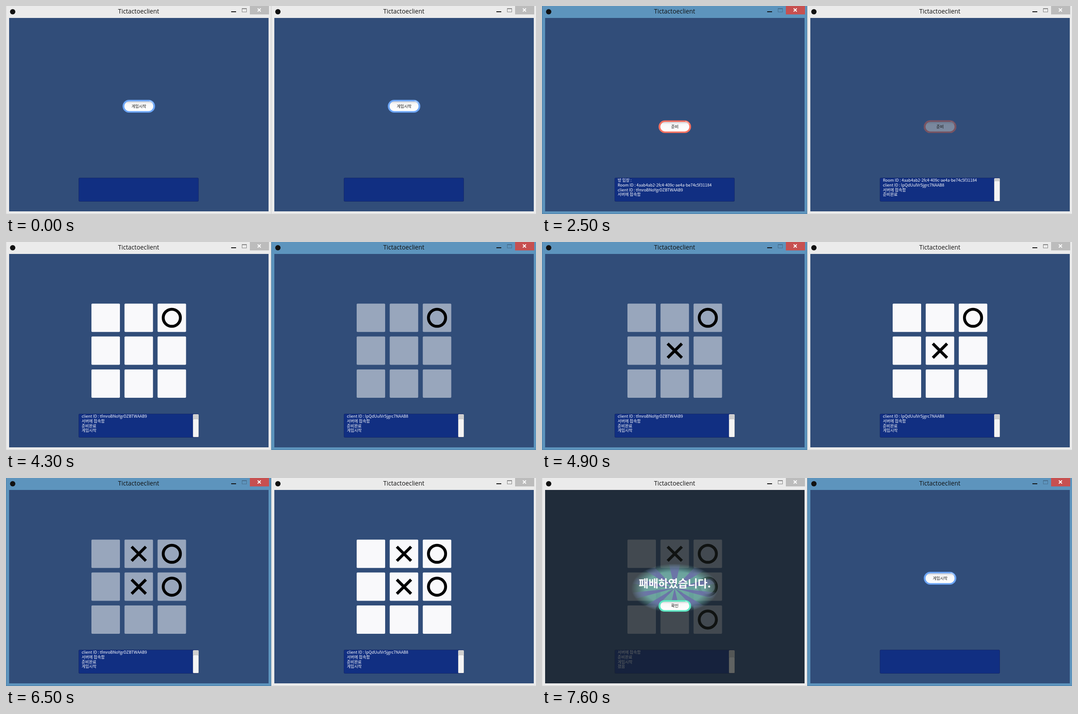
Animation, 1191 px wide and 470 px high, one loop 8000 ms. Source, as an HTML page with a canvas:

```html
<!DOCTYPE html>
<html lang="ko">
<head>
<meta charset="utf-8">
<title>Tictactoeclient</title>
<style>
  html, body { margin: 0; width: 100%; height: 100%; overflow: hidden; background: #ebebeb; }
  canvas { display: block; }
</style>
</head>
<body>
<canvas id="stage" width="1191" height="470"></canvas>
<script>
const ctx = document.getElementById('stage').getContext('2d');
const LOOP = 8000, STEP = 100;
const KOREAN = '"Noto Sans CJK KR", "Noto Sans CJK", sans-serif';

// Focus moves to the other window at each of these times.
const focusSwitches = [1900, 4000, 4700, 5400, 6200, 6800];

// Cell, time seen in the left window, time seen in the right window.
const moves = [[2, 4300, 4000], [4, 4700, 4900], [5, 5700, 5400], [1, 6200, 6500], [8, 7100, 6800]];

const players = [
  { x: 0, id: 'tfmroBNoYgrDZBTWAAB9', press: 2100, join: 2500, ready: [2700, 3000], readyLog: 2900,
    over: [7000, 7300], confirm: Infinity, leave: Infinity, result: '패배하였습니다.', note: '졌음' },
  { x: 596, id: 'lpQdUulVr5jgrc7NAAB8', press: 700, join: 1100, ready: [1300, 1600], readyLog: 1500,
    over: [6700, 6900], confirm: 7200, leave: 7500, result: '승리하였습니다.', note: '이겼음' }
];
const BOARD_TIME = 3100;

const ramp = (t, [from, to]) => Math.min(1, Math.max(0, (t - from) / (to - from)));

function rect(x, y, w, h, color) {
  ctx.fillStyle = color;
  ctx.fillRect(x, y, w, h);
}

function round(x, y, w, h, r, color) {
  ctx.beginPath();
  ctx.roundRect(x, y, w, h, r);
  ctx.fillStyle = color;
  ctx.fill();
}

function path(points, color, width) {
  ctx.beginPath();
  for (const [x1, y1, x2, y2] of points) {
    ctx.moveTo(x1, y1);
    ctx.lineTo(x2, y2);
  }
  ctx.strokeStyle = color;
  ctx.lineWidth = width;
  ctx.stroke();
}

function cross(x, y, d, color, width) {
  path([[x - d, y - d, x + d, y + d], [x - d, y + d, x + d, y - d]], color, width);
}

function label(text, x, y, font, color, align = 'center') {
  ctx.font = font;
  ctx.textAlign = align;
  ctx.textBaseline = 'middle';
  ctx.fillStyle = color;
  ctx.fillText(text, x, y);
}

function drawFrame(active) {
  rect(0, 0, 596, 470, active ? '#5d94bd' : '#ebebeb');
  ctx.strokeStyle = active ? '#4c7fa6' : '#dadada';
  ctx.lineWidth = 1;
  ctx.strokeRect(0.5, -1, 595, 470.5);
  ctx.beginPath();
  ctx.arc(15, 13, 6, 0, 7);
  ctx.fillStyle = '#111';
  ctx.fill();
  label('Tictactoeclient', 298, 13.5, '13.8px "Open Sans", sans-serif', '#111');
  rect(506, 12, 11, 2, '#111');
  const grey = active ? '#486f8e' : '#858585';
  ctx.strokeStyle = grey;
  ctx.strokeRect(530.5, 6.5, 10, 7);
  rect(530, 5, 11, 2, grey);
  rect(548, 0, 43, 19, active ? '#c75050' : '#bcbcbc');
  cross(569, 9, 3.5, '#fff', 2);
  rect(7, 27, 583, 437, '#314d79');
}

function drawButton(text, y, h, color, veil) {
  round(262, y, 73, h, h / 2, color);
  ctx.beginPath();
  ctx.arc(320, y + h / 2, h / 2 - 2, -1.4, -0.5);
  ctx.strokeStyle = 'rgba(255,255,255,.5)';
  ctx.lineWidth = 1.5;
  ctx.stroke();
  const shine = ctx.createLinearGradient(0, y + 3, 0, y + h - 3);
  shine.addColorStop(0, '#cfcfd4');
  shine.addColorStop(0.25, '#f8f8f8');
  shine.addColorStop(1, '#fff');
  round(266, y + 3.5, 65, h - 7, h / 2 - 3.5, shine);
  if (veil) round(262, y, 73, h, h / 2, veil);
  label(text, 298.5, y + h / 2, '9px ' + KOREAN, '#111');
}

function drawBoard(t, side) {
  const seen = moves.filter(m => t >= m[side + 1]);
  const myTurn = seen.length < 5 && seen.length % 2 !== side;
  const alpha = myTurn ? 0.97 : seen.length ? 0.5 : 1 - 0.5 * ramp(t, [BOARD_TIME - 100, 3300]);
  const at = cell => [192 + cell % 3 * 74.3, 139.3 + Math.floor(cell / 3) * 74.3];
  for (let cell = 0; cell < 9; cell++) round(...at(cell), 64, 64, 2, `rgba(255,255,255,${alpha})`);
  seen.forEach(([cell], i) => {
    const [x, y] = at(cell).map(v => v + 32);
    if (i % 2) return cross(x, y, 16, '#000', 6.5);
    ctx.beginPath();
    ctx.arc(x, y, 19.3, 0, 7);
    ctx.strokeStyle = '#000';
    ctx.lineWidth = 6.5;
    ctx.stroke();
  });
}

function drawLog(t, p) {
  round(163, 388, 270, 54, 3, '#15296a');
  round(164, 389, 268, 52, 2, '#112f82');
  if (t < p.join || t >= p.leave) return;
  const lines = ['방 입장 :', 'Room ID : 4aab4ab2-2fc4-409c-ae4a-be74c5f31184', 'client ID : ' + p.id, '서버에 접속함'];
  if (t >= p.readyLog) lines.push('준비완료');
  if (t >= BOARD_TIME) lines.push('게임시작');
  if (t > p.over[0]) lines.push(p.note);
  lines.slice(-4).forEach((line, i) => label(line, 170, 393.5 + i * 10.8, '9px ' + KOREAN, '#fff', 'left'));
  if (lines.length > 4) {
    const top = 395 + (lines.length - 5) * 4.7;
    round(420, 389, 13, 52, 2, '#cfcfcf');
    round(420, top, 13, 441 - top, 2, '#a9a9a9');
    round(420.5, top + 0.5, 12, 440 - top, 2, '#f4f4f4');
  }
}

function drawResult(t, p) {
  ctx.save();
  ctx.globalAlpha = ramp(t, p.over);
  rect(7, 27, 583, 437, 'rgba(25,29,28,.67)');
  ctx.save();
  ctx.translate(298, 249);
  ctx.scale(1, 0.57);
  const fade = (rgb, alpha) => {
    const glow = ctx.createRadialGradient(0, 0, 0, 0, 0, 98);
    glow.addColorStop(0, `rgba(${rgb},${alpha})`);
    glow.addColorStop(0.68, `rgba(${rgb},${alpha * 0.9})`);
    glow.addColorStop(1, `rgba(${rgb},0)`);
    return glow;
  };
  ctx.fillStyle = fade('120,190,180', 0.85);
  ctx.fillRect(-98, -98, 196, 196);
  ctx.fillStyle = fade('108,104,170', 0.85);
  for (let i = 0; i < 10; i++) {
    const a = i * Math.PI / 5 - Math.PI / 2;
    ctx.beginPath();
    ctx.moveTo(0, 0);
    ctx.arc(0, 0, 96, a - 0.13, a + 0.13);
    ctx.fill();
  }
  ctx.restore();
  label(p.result, 298.5, 238, 'bold 24px ' + KOREAN, '#fff');
  drawButton('확인', 276, 26, '#5fe8c4', t >= p.confirm && 'rgba(0,0,0,.2)');
  ctx.restore();
}

function drawClient(t, side) {
  const p = players[side];
  const leftActive = focusSwitches.filter(s => t >= s).length % 2 === 1;
  ctx.save();
  ctx.translate(p.x, 0);
  drawFrame(side ? t >= 500 && !leftActive : leftActive);
  drawLog(t, p);
  if (t < p.join || t >= p.leave) {
    const pressed = t >= p.press && t < p.join;
    drawButton('게임시작', 212, 29, '#6da6f6', pressed && 'rgba(0,0,0,.2)');
  } else if (t < BOARD_TIME) {
    drawButton('준비', 258.5, 28.5, '#f47262', `rgba(40,63,100,${0.608 * ramp(t, p.ready)})`);
  } else {
    drawBoard(t, side);
    if (t > p.over[0]) drawResult(t, p);
  }
  ctx.restore();
}

function render(now) {
  const t = Math.floor(now % LOOP / STEP) * STEP;
  drawClient(t, 0);
  drawClient(t, 1);
  requestAnimationFrame(render);
}
requestAnimationFrame(render);
</script>
</body>
</html>
```
